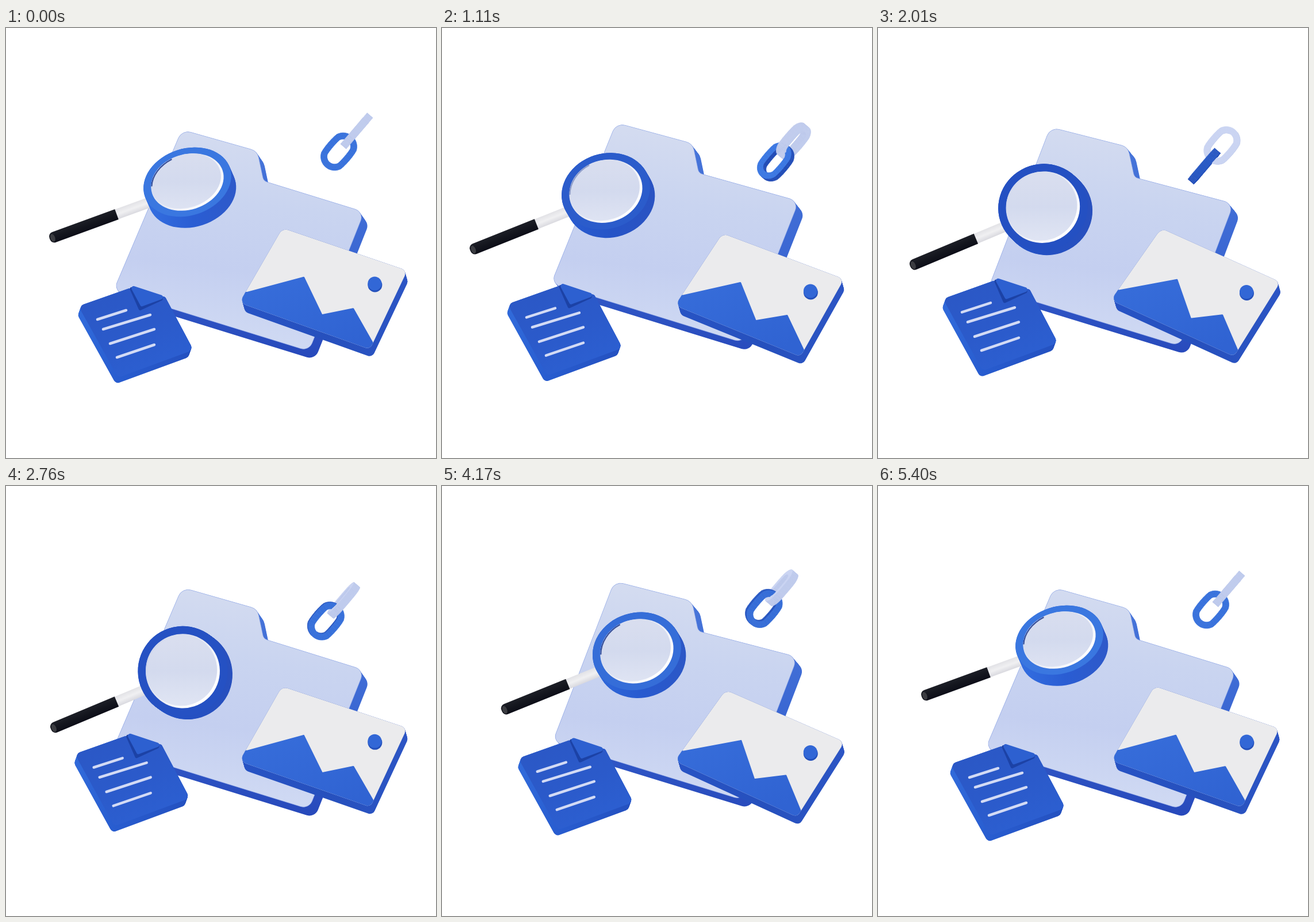
Recreate the animation shown at these times as an HTML page with a canvas. Size 748x748 px, loop 5.43 s.

```html
<!DOCTYPE html>
<html lang="en">
<head>
<meta charset="utf-8">
<title>Search files</title>
<style>
  html, body { margin: 0; width: 100%; height: 100%; overflow: hidden; background: #fff; }
  canvas { display: block; width: 748px; height: 748px; }
</style>
</head>
<body>
<canvas id="stage" width="748" height="748"></canvas>
<script>
const ctx = document.getElementById('stage').getContext('2d');
const LOOP = 5430, CYCLE = 5400, STEP = 30, TAU = Math.PI * 2;

// Corner table: x, y, radius, then cosine (x, y) and sine (x, y) swing
const FOLDER = [
  [306, 177, 18, 2.6, 6, 3.5, -1.7],
  [437, 214, 19, 1, 7, 1.5, 0],
  [448, 266, 11, 1, 7, 1, -1],
  [623, 320, 15, 2, 11, 2.5, 3],
  [527, 562, 16, 2, 8, 0, 0.5],
  [187, 457, 14, -2.5, 6.5, -3, -1]
];
const PHOTO = [
  [481, 348, 13, -5.5, -4, -6, 3.6],
  [698, 422, 9, -1, -10.5, -1, -9],
  [633, 559, 9, 7, -8, 6.5, -4],
  [406, 478, 10, 0.5, -1, 0.5, 5.5]
];
const PEAKS = [[0.01, 0.86], [0.325, 0.47], [0.575, 0.815], [0.76, 0.625], [1, 0.925]];
const PAGE = [[126, 484, 8], [214, 453, 3], [277, 468, 4], [326, 560, 8], [195, 608, 8]];
const LINES = [[159, 507, 209, 491], [169, 524, 251, 499], [181, 549, 258, 524], [193, 573, 258, 551]];

const clamp = (v, lo, hi) => Math.max(lo, Math.min(hi, v));
const mix = (a, b, t) => {
  const k = clamp(t, 0, 1);
  return `rgb(${a.map((v, i) => Math.round(v + (b[i] - v) * k))})`;
};

function swing(corners, a) {
  const c = Math.cos(a) - 1, s = Math.sin(a);
  return corners.map(([x, y, r, cx, cy, sx, sy]) => [x + cx * c + sx * s, y + cy * c + sy * s, r]);
}

function gradient(x0, y0, x1, y1, ...colors) {
  const g = ctx.createLinearGradient(x0, y0, x1, y1);
  colors.forEach((c, i) => g.addColorStop(i / (colors.length - 1), c));
  return g;
}

function roundPoly(pts, dx = 0, dy = 0) {
  const n = pts.length, last = pts[n - 1];
  ctx.beginPath();
  ctx.moveTo((last[0] + pts[0][0]) / 2 + dx, (last[1] + pts[0][1]) / 2 + dy);
  pts.forEach(([x, y, r], i) => {
    const q = pts[(i + 1) % n];
    ctx.arcTo(x + dx, y + dy, q[0] + dx, q[1] + dy, r);
  });
  ctx.closePath();
}

// Solid side made of outlines shifted from back to front
function extrude(outline, dx, dy, fill) {
  ctx.fillStyle = fill;
  for (let k = 16; k >= 0; k--) {
    outline(dx * k / 16, dy * k / 16);
    ctx.fill();
  }
}

function drawFolder(a) {
  const pts = swing(FOLDER, a);
  const outline = (dx, dy) => roundPoly(pts, dx, dy);
  extrude(outline, 11.5 - Math.cos(a) - Math.sin(a), 15,
    gradient(540, 230, 510, 570, '#4674d9', '#3a66d2', '#2749bb'));
  outline(0, 0);
  ctx.fillStyle = gradient(370, 185, 330, 530, '#d3dbf0', '#c9d4f0', '#c4cff0', '#cfd9f3');
  ctx.fill();
  ctx.strokeStyle = 'rgba(150,172,232,.6)';
  ctx.lineWidth = 1;
  ctx.stroke();
}

function drawPhoto(a) {
  const pts = swing(PHOTO, a);
  const at = (u, v) => [0, 1].map(i =>
    (pts[0][i] * (1 - u) + pts[1][i] * u) * (1 - v) + (pts[3][i] * (1 - u) + pts[2][i] * u) * v);
  const outline = (dx, dy) => roundPoly(pts, dx, dy);
  extrude(outline, 4, 14, gradient(420, 490, 690, 480, '#2753c4', '#2650bd', '#2c55c4'));
  outline(0, 0);
  ctx.fillStyle = '#ebebed';
  ctx.fill();

  ctx.save();
  ctx.clip();
  ctx.beginPath();
  [[-0.1, 1.2], [-0.1, 0.91], ...PEAKS, [1.1, 1.15], [1.1, 1.3]].forEach(([u, v]) => ctx.lineTo(...at(u, v)));
  ctx.closePath();
  ctx.fillStyle = gradient(500, 430, 560, 570, '#366cd9', '#3063d2');
  ctx.strokeStyle = ctx.fillStyle;
  ctx.lineJoin = 'round';
  ctx.lineWidth = 3;
  ctx.fill();
  ctx.stroke();
  ctx.restore();

  const [x, y] = at(0.822, 0.27);
  disc(x + 0.5, y + 1.5, 12.5, '#2450bb');
  disc(x, y - 1, 12, '#3267d6');
}

function disc(x, y, r, fill) {
  ctx.beginPath();
  ctx.arc(x, y, r, 0, TAU);
  ctx.fillStyle = fill;
  ctx.fill();
}

function drawLens(a) {
  const c = Math.cos(a), s = Math.sin(a);
  const x = 310.5 + 5 * c - 28 * s, y = 293 - 27 * c + 2 * Math.cos(2 * a);
  const dx = 8.5, dy = 12.8 + 6.7 * c;
  const ratio = 0.873 - 0.128 * c;
  const tilt = -0.315;
  const light = Math.pow((1 + Math.cos(a + 0.44)) / 2, 1.4);
  const ellipse = (r, ox = 0, oy = 0, from = 0, to = TAU) => {
    ctx.beginPath();
    ctx.ellipse(x + ox, y + oy, r, r * ratio, tilt, from, to);
  };

  // Handle
  const tx = 84.5 - 28 * s, ty = 391.5 - 28 * c;
  const ax = x + dx / 2 - tx, ay = y + dy / 2 - ty;
  ctx.save();
  ctx.translate(tx, ty);
  ctx.rotate(Math.atan2(ay, ax));
  ctx.fillStyle = gradient(0, -9, 0, 9, '#e2e2e6', '#f0f0f2', '#d9d9df');
  ctx.fillRect(110, -9, Math.hypot(ax, ay) - 110 - 70, 18);
  ctx.beginPath();
  ctx.roundRect(-9, -9.5, 124, 19, [8, 0, 0, 8]);
  ctx.fillStyle = gradient(0, -10, 0, 10, '#1d1f27', '#14161e', '#0c0d17');
  ctx.fill();
  ctx.beginPath();
  ctx.ellipse(-3.5, 0.5, 4, 7, 0, 0, TAU);
  ctx.fillStyle = '#3b3c41';
  ctx.fill();
  ctx.restore();

  // Ring
  const side = gradient(x - 70, y + 30, x + 85, y + 20,
    mix([36, 84, 200], [52, 112, 226], light),
    mix([36, 80, 194], [42, 94, 212], light),
    mix([40, 80, 190], [46, 90, 202], light));
  extrude((ox, oy) => ellipse(78, ox, oy), dx, dy, side);
  ellipse(78);
  ctx.fillStyle = mix([36, 80, 194], [60, 122, 226], light);
  ctx.fill();

  // Glass
  ellipse(64.5);
  ctx.fillStyle = gradient(x - 50, y - 40, x + 40, y + 35, '#d4daec', '#e6e9f4', '#ffffff');
  ctx.fill();
  ellipse(62, -2.2, -1.7);
  ctx.fillStyle = gradient(x, y - 55, x, y + 55, '#d9deef', '#d3daee', '#dfe4f3');
  ctx.fill();
  ellipse(63.5, 0, 0, 3.4, 4.5);
  ctx.strokeStyle = `rgba(28,56,140,${clamp(light * 1.3, 0, 0.85)})`;
  ctx.lineWidth = 2.2;
  ctx.stroke();
}

function drawPage(a) {
  const c = Math.cos(a), s = Math.sin(a);
  ctx.save();
  ctx.translate(3.5 * (c - 1) - 9.9 * s, 8 * (c - 1) + 2.8 * s);
  // Leans slightly as it rises, pivoting on its lower edge
  ctx.translate(0, 617);
  ctx.scale(1, 1 + 0.006 * (1 - c));
  ctx.translate(0, -617);
  extrude((dx, dy) => roundPoly(PAGE, dx, dy), -4, 11,
    gradient(140, 500, 320, 580, '#3069d9', '#285ccf', '#2450bf'));
  roundPoly(PAGE);
  ctx.fillStyle = gradient(190, 460, 250, 600, '#2b58c6', '#2b5aca', '#2c5fd1');
  ctx.fill();

  roundPoly([[213, 449, 3], [280, 470, 4], [232, 492, 3]]);
  ctx.fillStyle = '#1c42a6';
  ctx.fill();
  roundPoly([[214, 446, 4], [281, 468, 4], [235, 485, 3]]);
  ctx.fillStyle = '#2d60d0';
  ctx.fill();

  ctx.strokeStyle = '#d3dbf5';
  ctx.lineWidth = 4.5;
  ctx.lineCap = 'round';
  ctx.beginPath();
  for (const [x0, y0, x1, y1] of LINES) {
    ctx.moveTo(x0, y0);
    ctx.lineTo(x1, y1);
  }
  ctx.stroke();
  ctx.restore();
}

// Square-section link: a stadium ring lying in the plane of axis U and vector w
const U = [0.65, -0.76, 0], LIGHT = [-0.35, -0.5, 0.79], SEGMENTS = 48;
const dot = (p, q) => p[0] * q[0] + p[1] * q[1] + p[2] * q[2];
const dir = a => [0.76 * Math.cos(a), 0.65 * Math.cos(a), Math.sin(a)];

function linkFaces(center, w, n, dark, bright) {
  const point = (i, r, h) => {
    const t = i / SEGMENTS * TAU, c = Math.cos(t);
    const along = r * c + 11.5 * clamp(3 * c, -1, 1), across = r * Math.sin(t);
    return center.map((v, k) => v + U[k] * along + w[k] * across + n[k] * h);
  };
  const faces = [];
  const add = (pts, normal, gain) => {
    if (normal[2] < 0.01) return;
    const z = pts.reduce((sum, p) => sum + p[2], 0) / 4;
    const lit = (0.5 + 0.5 * dot(normal, LIGHT)) * gain;
    faces.push({ pts, z, fill: mix(dark, bright, lit) });
  };
  const R = 24, r = 13, h = 6.5;
  for (let i = 0; i < SEGMENTS; i++) {
    const j = i + 1, t = (i + 0.5) / SEGMENTS * TAU;
    const out = U.map((v, k) => v * Math.cos(t) + w[k] * Math.sin(t));
    const quad = (r0, h0, r1, h1) => [point(i, r0, h0), point(j, r0, h0), point(j, r1, h1), point(i, r1, h1)];
    add(quad(R, h, r, h), n, 1);
    add(quad(R, -h, r, -h), n.map(v => -v), 1);
    add(quad(R, h, R, -h), out, 0.5);
    add(quad(r, h, r, -h), out.map(v => -v), 0.4);
  }
  return faces;
}

function drawChain(a) {
  const c = Math.cos(a), s = Math.sin(a);
  const x = 583.5 + 11 * c + 9.8 * s, y = 207.3 - 10.3 * c + 11 * s;
  const p = dir(-2 * a), q = dir(-2 * a + Math.PI / 2);
  const faces = [
    ...linkFaces([x - 15.5, y + 18, 0], p, q, [28, 66, 172], [60, 120, 226]),
    ...linkFaces([x + 15.5, y - 18, 0], q, p, [182, 195, 232], [204, 214, 243])
  ].sort((f, g) => f.z - g.z);
  ctx.lineWidth = 0.7;
  ctx.lineJoin = 'round';
  for (const f of faces) {
    ctx.beginPath();
    f.pts.forEach(v => ctx.lineTo(v[0], v[1]));
    ctx.closePath();
    ctx.fillStyle = ctx.strokeStyle = f.fill;
    ctx.fill();
    ctx.stroke();
  }
}

function draw(ms) {
  const a = Math.floor(ms % LOOP / STEP) * STEP / CYCLE * TAU;
  ctx.fillStyle = '#fff';
  ctx.fillRect(0, 0, 748, 748);
  drawFolder(2 * a);
  drawPhoto(2 * a);
  drawLens(a);
  drawPage(a);
  drawChain(a);
}

const start = performance.now();
function tick() {
  draw(performance.now() - start);
  requestAnimationFrame(tick);
}
tick();
</script>
</body>
</html>
```
